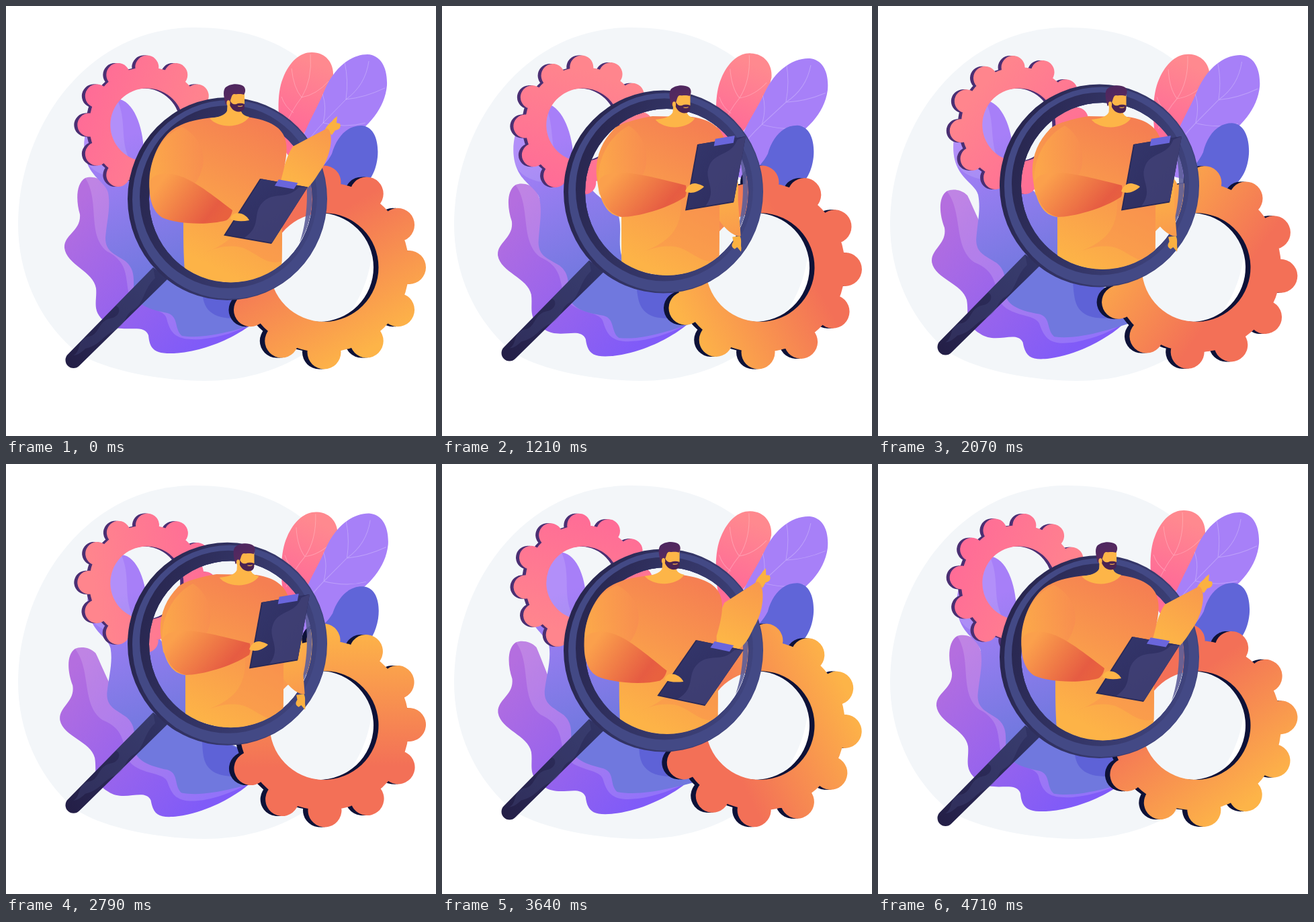
Recreate the animation shown at these times as an HTML page. Size 640x640 px, loop 4780 ms.

```html
<!DOCTYPE html>
<html lang="en">
<head>
<meta charset="utf-8">
<title>Magnifier and gears</title>
<style>
html, body { margin: 0; width: 100%; height: 100%; overflow: hidden; background: #fff; }
svg { display: block; width: 100vw; height: 100vh; }
.vein { fill: none; stroke: #fff; stroke-opacity: .25; stroke-width: 1; }
</style>
</head>
<body>
<svg viewBox="0 0 640 640">
<defs>
  <linearGradient id="gPurple" gradientUnits="userSpaceOnUse" x1="95" y1="300" x2="290" y2="500"><stop stop-color="#b46edf"/><stop offset="1" stop-color="#805bf8"/></linearGradient>
  <linearGradient id="gBlue" gradientUnits="userSpaceOnUse" x1="160" y1="200" x2="235" y2="400"><stop stop-color="#a77ff8"/><stop offset="1" stop-color="#7078de"/></linearGradient>
  <linearGradient id="gPink" gradientUnits="userSpaceOnUse" x1="460" y1="85" x2="425" y2="175"><stop stop-color="#ff898f"/><stop offset="1" stop-color="#ff6c97"/></linearGradient>
  <linearGradient id="gSmall" gradientUnits="userSpaceOnUse" x1="-105" y1="-20" x2="70" y2="40"><stop stop-color="#ff6b97"/><stop offset="1" stop-color="#ff858d"/></linearGradient>
  <linearGradient id="gBig" gradientUnits="userSpaceOnUse" x1="-70" y1="-121" x2="70" y2="121"><stop offset=".28" stop-color="#f37057"/><stop offset="1" stop-color="#fdb448"/></linearGradient>
  <linearGradient id="gRim" gradientUnits="userSpaceOnUse" x1="190" y1="250" x2="470" y2="330"><stop stop-color="#28264f"/><stop offset="1" stop-color="#40457f"/></linearGradient>
  <linearGradient id="gHandle" gradientUnits="userSpaceOnUse" x1="95" y1="535" x2="235" y2="395"><stop stop-color="#241f47"/><stop offset="1" stop-color="#313465"/></linearGradient>
  <linearGradient id="gTorso" gradientUnits="userSpaceOnUse" x1="400" y1="185" x2="300" y2="385"><stop stop-color="#f57f52"/><stop offset="1" stop-color="#fdb347"/></linearGradient>
  <linearGradient id="gShoulder"><stop offset=".1" stop-color="#fca94a"/><stop offset="1" stop-color="#f88d50"/></linearGradient>
  <linearGradient id="gFore" y1=".15" y2=".6"><stop offset=".12" stop-color="#fba04c"/><stop offset=".85" stop-color="#e65c42"/><stop offset="1" stop-color="#e8613f"/></linearGradient>
  <linearGradient id="gSleeve" gradientUnits="userSpaceOnUse" x1="475" y1="185" x2="425" y2="265"><stop stop-color="#f99a4c"/><stop offset="1" stop-color="#fdb547"/></linearGradient>
  <linearGradient id="gBoard" x2="1" y2="1"><stop stop-color="#33356a"/><stop offset="1" stop-color="#2e2d5e"/></linearGradient>
  <linearGradient id="gHair" x2=".6" y2="1"><stop stop-color="#4b2660"/><stop offset="1" stop-color="#5b2b5e"/></linearGradient>
  <clipPath id="lensClip">
    <rect width="640" height="298"/>
    <ellipse id="lensHole" cx="334.5" cy="287.5" rx="121.5" ry="124"/>
  </clipPath>
</defs>

<path fill="#f3f6f9" d="M18 325C18 180 120 32 280 32C350 32 400 50 440 80C500 130 548 250 546 350C544 410 520 470 445 517C400 545 350 558 295 558C240 558 150 545 105 515C50 470 18 400 18 325Z"/>

<g id="purpleLeaf">
  <path fill="url(#gPurple)" d="M118 256C104 264 104 290 110 310C112 335 86 340 87 360C90 385 130 395 134 420C136 440 126 455 150 472C172 490 205 470 212 490C214 512 222 518 250 517C300 514 345 490 365 474L400 440L260 430C225 420 215 395 202 370C170 340 160 295 148 265C140 255 126 253 118 256Z"/>
  <path fill="#fff" opacity=".15" d="M118 256C140 290 120 340 150 365C180 380 178 400 182 425C195 452 235 448 239 465C245 490 255 498 290 496C320 493 345 484 365 474L400 440L260 430C225 420 215 395 202 370C170 340 160 295 148 265C140 255 126 253 118 256Z"/>
</g>

<g id="blueLeaf">
  <path fill="url(#gBlue)" d="M400 465C350 480 300 497 262 491C250 482 258 462 240 457C215 452 192 445 190 425C190 405 192 392 178 380C160 368 148 365 148 345C150 320 156 300 152 278C148 262 125 255 118 225C110 190 130 140 165 138C190 140 204 180 205 215C206 250 238 280 266 300C276 325 265 345 271 370C295 400 350 430 400 440Z"/>
  <path fill="#fff" opacity=".12" d="M165 138C185 180 160 215 205 255C175 262 125 255 118 225C110 190 130 140 165 138Z"/>
  <path fill="#5e62d7" d="M285 385C296 410 286 440 304 455C320 469 345 465 400 462V440C350 430 310 410 285 385Z"/>
</g>

<g id="pinkLeaf">
  <path fill="url(#gPink)" d="M415 215C403 170 403 130 412 108C422 82 438 69 455 69C476 69 488 85 487 104C480 140 465 160 440 195L425 230Z"/>
  <path class="vein" d="M414 182Q425 155 440 136Q456 110 453 72M440 136Q428 122 425 93M440 136Q462 132 480 112M428 159Q415 150 410 135"/>
</g>
<g id="lilacLeaf">
  <path fill="#a780f8" d="M425 250C438 190 460 160 473 128C488 90 515 72 538 72C558 73 568 92 567 118C564 155 535 185 500 205C485 215 478 245 465 260Z"/>
  <path class="vein" d="M440 215Q452 195 472 174L506 139Q535 118 540 82M506 139Q510 110 504 84M506 139Q535 136 564 122M472 174Q478 150 471 131M472 174Q505 182 535 174"/>
</g>
<path id="indigoLeaf" fill="#6065d8" d="M440 290C455 250 475 240 485 220C492 195 508 177 530 178C550 180 555 205 553 225C550 250 540 266 515 282Z"/>

<g id="gears"></g>

<g id="glass">
  <path fill="url(#gHandle)" d="M219 389L92 518.5A11.8 11.8 0 0 0 109 535.5L241 406Z"/>
  <path fill="#4a4f86" opacity=".3" d="M219 389L163 446C172 448 170 463 155 465C135 470 140 490 122 492C105 497 112 515 100 520C106 520 112 516 118 510C140 505 145 490 160 484C180 475 175 460 190 452C205 444 205 420 222 405Z"/>
  <g id="rim" fill-rule="evenodd"></g>
  <path fill="#5c5f99" opacity=".9" d="M440 226C461 262 461 315 437 352C450 315 452 262 440 226Z"/>
</g>

<g id="arm">
  <path fill="#fbb141" d="M475 184C478 176 484 174 488 168L493 164L492 174L497 175C499 180 497 184 490 185L485 192Z"/>
  <path id="sleeve" fill="url(#gSleeve)"/>
</g>
<g clip-path="url(#lensClip)">
  <path id="torso" fill="url(#gTorso)"/>
  <path id="fold" fill="#f78d4e" opacity=".4"/>
</g>
<path id="shoulder" fill="url(#gShoulder)" opacity=".75"/>
<path id="forearm" fill="url(#gFore)"/>
<g id="head">
  <path fill="#fdb548" d="M330 138L329 156C326 163 315 166 303 167C315 182 350 183 362 165C353 163 350 160 349 152L355 146V128L334 128Z"/>
  <path fill="url(#gHair)" d="M327 147C325 138 322 128 326 122C331 116 345 114 353 119C357 122 357 128 354 132C348 130 344 132 340 131C335 131 336 138 333 142Z"/>
  <path fill="#4a2352" d="M333 140C336 146 339 147 343 146C347 144 352 145 355 146C355 151 355 155 350 157C341 159 335 153 333 147Z"/>
  <ellipse cx="331" cy="144.5" rx="2.6" ry="4.2" fill="#fdb548"/>
  <path fill="none" stroke="#fdb548" stroke-width="1.2" d="M345 149Q349 150 352 148.5"/>
</g>
<g id="board">
  <path fill="#292957" d="M0 0H72V100H0Z"/>
  <path fill="url(#gBoard)" d="M2 0H72V98H2Z"/>
  <path fill="#4a4a80" opacity=".55" d="M30 98C44 75 20 58 24 38C28 15 55 28 60 3L72 0V98Z"/>
  <path fill="#6a66dc" d="M26 -4H55V7H26Z"/>
</g>
<path id="hand" fill="#fdb447"/>
</svg>

<script>
const LOOP = 4780, STEP = LOOP / 67, TAU = Math.PI * 2;
const el = id => document.getElementById(id);
const move = (id, t) => el(id).setAttribute('transform', t);

// blends two path strings that share the same commands
const NUM = /-?[\d.]+/g;
function mix(a, b, p) {
  const to = b.match(NUM);
  let i = 0;
  return a.replace(NUM, n => (+n + (to[i++] - n) * p).toFixed(2));
}
const lerp = (a, b, p) => a + (b - a) * p;

const oval = (x, y, rx, ry = rx, sweep = 1) =>
  `M${x - rx} ${y}a${rx} ${ry} 0 1 ${sweep} ${2 * rx} 0a${rx} ${ry} 0 1 ${sweep} ${-2 * rx} 0Z`;

function gearPath(body, tooth, hole) {
  let d = oval(0, 0, body) + oval(0, 0, hole, hole, 0);
  for (let i = 0; i < 12; i++) {
    const a = i * TAU / 12;
    d += oval(body * Math.cos(a), body * Math.sin(a), tooth);
  }
  return d;
}

const gears = [
  { x: 209.8, y: 177, d: gearPath(86, 17.5, 54.5), fill: 'url(#gSmall)', dark: '#4b2f73', depth: 5, dir: -1, turn: 0 },
  { x: 473.5, y: 389, d: gearPath(126.5, 25, 81), fill: 'url(#gBig)', dark: '#0e1238', depth: 7.5, dir: 1, turn: 0 }
];
const addPath = (parent, d, fill) => {
  const n = document.createElementNS('http://www.w3.org/2000/svg', 'path');
  n.setAttribute('d', d);
  n.setAttribute('fill', fill);
  return el(parent).appendChild(n);
};
for (const g of gears) {
  g.layers = [g.depth, g.depth / 2, 0].map(dx => ({ dx, node: addPath('gears', g.d, dx ? g.dark : g.fill) }));
}

const hole = oval(334.5, 287.5, 121.5, 124);
addPath('rim', oval(329.5, 287, 148.5, 151) + hole, 'url(#gRim)');
addPath('rim', oval(332.5, 288, 144.5, 148) + hole, '#434985');
addPath('rim', oval(331, 284, 132, 136) + hole, 'url(#gRim)');

// each part: pointing pose, reading pose
const shapes = {
  torso: [
    'M308 166C285 168 258 174 243 188C222 208 210 245 214 275C218 305 232 318 264 320L264 335C264 375 266 400 270 440L405 440C411 410 411 370 411 335L409 260C416 235 420 215 416 200C412 182 395 170 358 165Z',
    'M313 164C290 168 268 174 258 181C238 200 228 225 230 252C234 290 245 312 267 314L267 335C267 375 267 400 269 440L408 440C412 410 413 370 413 335L413 300C420 260 428 225 421 200C416 184 405 170 372 165Z'],
  fold: [
    'M297 367C333 352 356 335 354 288L411 288L411 380C383 388 368 360 343 358C323 356 308 362 297 367Z',
    'M299 366C335 352 358 335 356 288L413 288L413 378C385 388 370 360 345 358C325 356 310 362 299 366Z'],
  shoulder: [
    'M262 180C285 192 297 215 293 238C289 254 284 262 277 268L240 300L216 285C208 240 225 195 262 180Z',
    'M278 178C298 190 308 215 303 240C300 252 296 256 290 262L255 300L234 280C226 235 246 195 278 178Z'],
  forearm: [
    'M232 250C262 246 290 268 337 304C336 310 333 316 328 319C300 327 255 324 235 316C218 308 212 285 214 262C216 255 222 251 232 250Z',
    'M248 250C272 243 320 256 363 267C364 273 364 279 362 284C335 302 290 314 268 314C245 310 235 285 232 262C236 255 240 252 248 250Z'],
  hand: [
    'M334 317C336 309 342 307 350 309C356 311 360 315 362 319C352 321 342 321 334 317Z',
    'M362 276C365 266 374 262 381 265C385 266 388 267 390 269C380 278 370 280 362 276Z'],
  sleeve: [
    'M427 209L478 182C489 188 484 225 466 248C456 264 446 278 430 280C410 280 404 268 408 255C415 238 418 222 427 209Z',
    'M434 228L474 183C485 190 486 224 471 254C460 268 446 278 430 280C410 280 404 268 408 255C415 244 424 238 434 228Z']
};

const poseKeys = [[0, 0], [740, 1], [2860, 1], [3570, -.1], [4250, 0], [LOOP, 0]];
function poseAt(t) {
  let i = 1;
  while (i < poseKeys.length - 1 && t > poseKeys[i][0]) i++;
  const [t0, a] = poseKeys[i - 1], [t1, b] = poseKeys[i];
  return lerp(a, b, (1 - Math.cos(Math.PI * (t - t0) / (t1 - t0))) / 2);
}

function draw(t) {
  const u = t / LOOP, w = u * TAU;
  const sway = (1 - Math.cos(w)) / 2;

  move('purpleLeaf', `rotate(${-5 * sway} 343 452)`);
  move('blueLeaf', `rotate(${-2.3 * Math.sin(w)} 335 460)`);
  move('pinkLeaf', `rotate(${2.7 * sway} 400 250)`);
  move('lilacLeaf', `rotate(${3.1 * (1 - Math.cos(2 * w)) / 2} 430 250)`);
  move('indigoLeaf', `rotate(${3.3 * Math.sin(2 * w)} 440 245)`);

  for (const g of gears) {
    const a = g.turn + g.dir * 360 * u;
    for (const l of g.layers) l.node.setAttribute('transform', `translate(${g.x - l.dx} ${g.y}) rotate(${a})`);
  }

  const lift = `translate(0 ${-20.5 * sway})`;
  move('glass', lift);
  move('lensHole', lift);

  const p = poseAt(t);
  for (const id in shapes) el(id).setAttribute('d', mix(...shapes[id], p));
  move('head', `translate(${14.5 * p} ${2 * p})`);
  // the forearm swing trails the body
  const swing = p * (70 + 64 * p * p);
  move('arm', `translate(${428 - 4 * p} ${260 + 6 * p}) rotate(${swing}) scale(${1 - .12 * p}) translate(-428 -260)`);
  const m = [lerp(71, 72, p) / 72, lerp(12.5, -12, p) / 72, lerp(-54, -18, p) / 100, lerp(84.5, 98.5, p) / 100, lerp(378, 380, p), lerp(257, 206, p)];
  move('board', `matrix(${m.join(' ')})`);
}

const start = performance.now();
function tick(now) {
  const t = Math.max(0, now - start) % LOOP;
  draw(Math.floor(t / STEP + .1) % 67 * STEP);
  requestAnimationFrame(tick);
}
draw(0);
requestAnimationFrame(tick);
</script>
</body>
</html>
```
